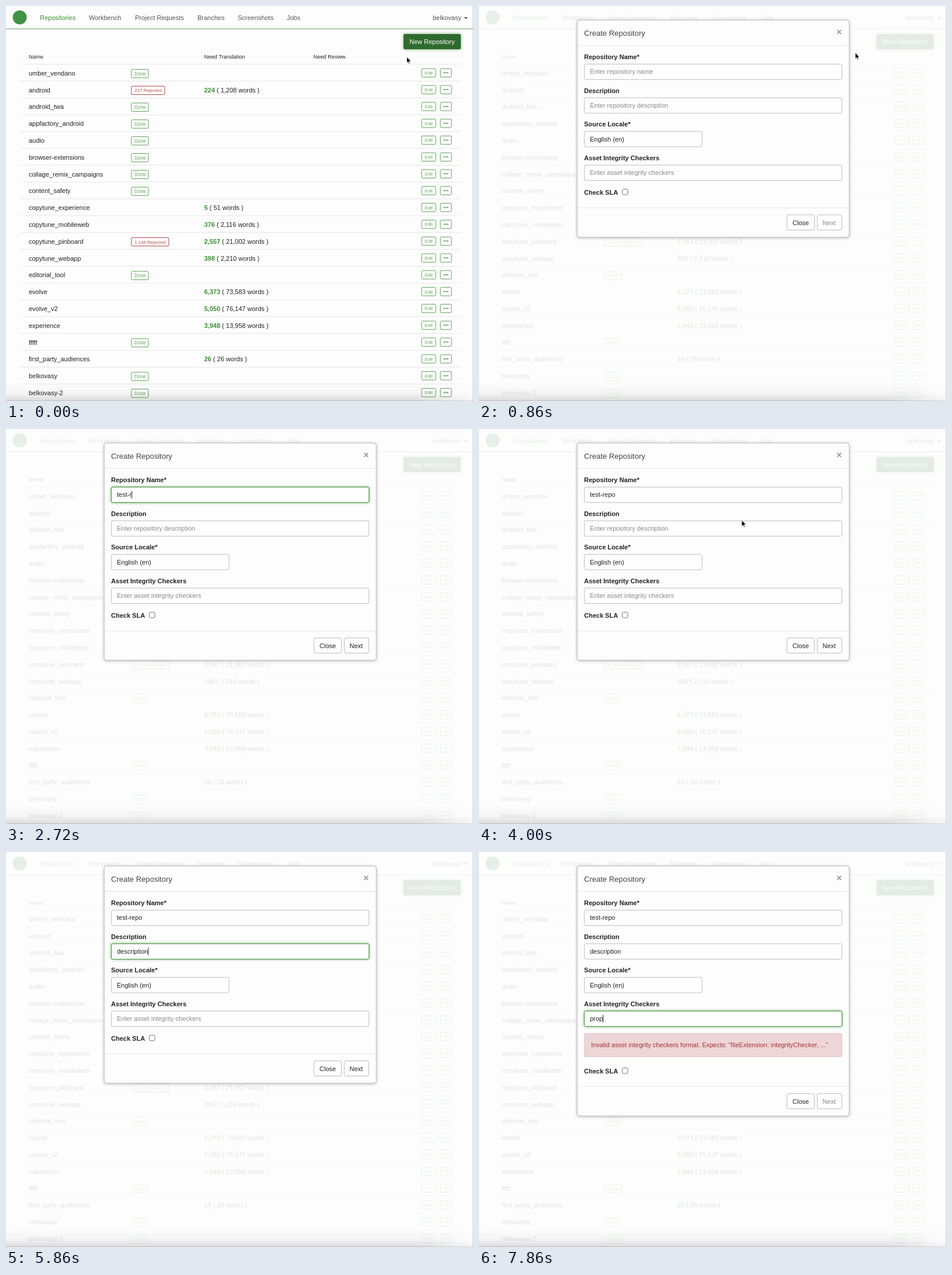
Write an HTML page that moves like this. It is 800x676 px and loops after 8 s.

```html
<!DOCTYPE html>
<html lang="en">
<head>
<meta charset="utf-8">
<title>Create Repository</title>
<style>
  html, body { margin: 0; width: 100%; height: 100%; overflow: hidden; background: #fdfdfd; }
  svg { display: block; width: 800px; height: 676px; }
  text { font: 11px "Liberation Sans", Arial, sans-serif; fill: #222; white-space: pre; }
  .b { font-weight: 700; }
  .green, .num { fill: #3c8f35; }
  .num { font-weight: 700; }
  .nav { fill: #555; }
  .box { fill: #fefefe; stroke: #bdbdbd; }
  .glow { fill: #fefefe; stroke: #45913c; filter: drop-shadow(0 0 2.5px rgba(80, 165, 65, .7)); }
  .ok { fill: none; stroke: #58a650; }
  .bad { fill: none; stroke: #b04343; }
  .line { stroke: #e6e6e6; }
  .hint { fill: #888; }
  #sheet { filter: drop-shadow(0 1px 2.5px rgba(0, 0, 0, .25)); fill: #fdfdfd; stroke: #b9b9b9; }
  #popup { filter: drop-shadow(0 1px 3px rgba(0, 0, 0, .35)); }
</style>
</head>
<body>
<svg viewBox="0 0 800 676">
  <defs>
    <linearGradient id="shade" x2="0" y2="1">
      <stop offset="0" stop-color="#000" stop-opacity="0"/>
      <stop offset=".6" stop-color="#000" stop-opacity=".035"/>
      <stop offset="1" stop-color="#000" stop-opacity=".14"/>
    </linearGradient>
    <linearGradient id="side">
      <stop offset=".88" stop-color="#fff"/>
      <stop offset="1" stop-color="#fff" stop-opacity=".25"/>
    </linearGradient>
    <mask id="fade"><rect y="640" width="800" height="36" fill="url(#side)"/></mask>
  </defs>

  <g id="page"></g>
  <rect id="backdrop" width="800" height="676" fill="#fdfdfd"/>
  <g mask="url(#fade)"><rect y="644" width="800" height="32" fill="url(#shade)"/></g>
  <path d="M0 675.5H800M799.5 0V676" stroke="#000" stroke-opacity=".12"/>

  <g id="modal">
    <rect id="sheet" x="168.2" y="24" width="466" rx="4"/>
    <path class="line" d="M169 67.5H634"/>
    <g id="form"></g>
    <g id="error">
      <rect x="180.4" y="310.4" width="441.400" height="40" rx="2.5" fill="#eed5d7" stroke="#e4c5c8"/>
    </g>
    <g id="foot">
      <path class="line" d="M169 345.5H634"/>
      <rect x="245.5" y="313.5" width="9.5" height="9.5" rx="2" fill="#fff" stroke="#777"/>
      <rect class="box" x="527.5" y="357.5" width="47" height="26" rx="2.5"/>
      <rect class="box" x="579.5" y="357.5" width="42" height="26" rx="2.5"/>
    </g>
    <g id="popup">
      <path d="M263 306h-1a4 4 0 0 0-4 4v26.500a4 4 0 0 0 4 4h113a4 4 0 0 0 4-4v-26.500a4 4 0 0 0-4-4H280L273 299.500 266 306z" fill="#fefefe"/>
    </g>
  </g>
  <path id="cursor" d="M0 0V10.600L2.400 8.400 4 12.100 5.700 11.400 4.100 7.800H7.500Z" fill="#000" stroke="#fff" stroke-width=".8"/>
</svg>

<script>
const LOOP = 8000;
const ROW = 28.8;
const $ = id => document.getElementById(id);

function add(parent, tag, attrs) {
  const el = document.createElementNS("http://www.w3.org/2000/svg", tag);
  for (const key in attrs) el.setAttribute(key, attrs[key]);
  return parent.appendChild(el);
}

// Text placed by its left edge and the middle of its capitals
function text(parent, x, mid, str, size = 11, cls = "", style = "") {
  const el = add(parent, "text", { x, y: mid + size * .35, class: cls, style: `font-size:${size}px;${style}` });
  el.textContent = str;
  return el;
}

function box(parent, x, y, width, height, cls, rx = 1.5) {
  return add(parent, "rect", { x: x + .4, y: y + .4, width, height, rx, class: cls });
}

function buildPage() {
  const page = $("page");
  add(page, "circle", { cx: 23.5, cy: 19.5, r: 12, fill: "#3f9344" });
  text(page, 58, 20, "Repositories", 11, "green");
  const nav = { Workbench: 142, "Project Requests": 221, Branches: 328, Screenshots: 397, Jobs: 481, belkovasy: 731 };
  for (const label in nav) text(page, nav[label], 20, label, 11, "nav");
  add(page, "path", { d: "M784.500 19h6.600l-3.300 3.400z", fill: "#555" });
  add(page, "path", { d: "M0 39.1H800", stroke: "#5da457" });

  add(page, "rect", {
    x: 681, y: 48, width: 98, height: 26, rx: 2, fill: "#2f6a2e",
    style: "filter:drop-shadow(0 0 2.500px rgba(70,150,60,.8))"
  });
  text(page, 691, 61, "New Repository", 11, "", "fill:#fff");

  text(page, 39, 87, "Name", 9.3);
  text(page, 339.5, 87, "Need Translation", 9.3);
  text(page, 526.5, 87, "Need Review", 9.3);

  // name | rejected count | strings | words
  const rows = `umber_vendano
android|227|224|1,208
android_twa
appfactory_android
audio
browser-extensions
collage_remix_campaigns
content_safety
copytune_experience||5|51
copytune_mobileweb||376|2,116
copytune_pinboard|1,146|2,557|21,002
copytune_webapp||398|2,210
editorial_tool
evolve||6,373|73,583
evolve_v2||5,050|76,147
experience||3,948|13,958
fffff
first_party_audiences||26|26
belkovasy
belkovasy-2`.split("\n");

  rows.forEach((row, i) => {
    const [name, rejected, count, words] = row.split("|");
    const y = i * ROW;
    add(page, "path", { class: "line", d: `M24 ${99.7 + y}H779` });
    text(page, 39, 114.9 + y, name);
    if (rejected) {
      box(page, 214.5, 108 + y, rejected.length > 3 ? 64 : 57, 14.4, "bad");
      text(page, 220, 115.8 + y, rejected + " Rejected", 8, "", "fill:#b85252");
    } else if (!count) {
      box(page, 214.5, 108 + y, 29, 14.4, "ok");
      text(page, 220, 115.8 + y, "Done", 8.2, "", "fill:#66ad5e");
    }
    if (count) {
      const cell = text(page, 339.5, 114.9 + y, "");
      add(cell, "tspan", { class: "num" }).textContent = count;
      add(cell, "tspan", {}).textContent = ` ( ${words} words )`;
    }
    box(page, 711.7, 106.8 + y, 24, 14.4, "ok");
    text(page, 717.3, 114.3 + y, "Edit", 8, "", "fill:#66ad5e");
    box(page, 743.7, 106.8 + y, 19, 14.4, "ok");
    for (const x of [750.6, 753.6, 756.6])
      add(page, "circle", { cx: x, cy: 114.3 + y, r: 1, fill: "#35702f" });
  });
}

// Label above an empty control
function control(y, label, width) {
  text($("form"), 180, y - 11.6, label, 11, "b");
  box($("form"), 180, y, width, 26.4, "box", 2.5);
}

// An input with label, focus ring, typed value and caret
function field(y, label, hint) {
  const form = $("form");
  control(y, label, 441.4);
  const ring = box(form, 180, y, 441.4, 26.4, "glow", 2.5);
  const value = text(form, 190, y + 13.6, "");
  const caret = add(form, "path", { stroke: "#222" });
  return (str, focus) => {
    ring.setAttribute("opacity", focus);
    value.textContent = str || hint;
    value.setAttribute("class", str ? "" : "hint");
    const x = 190.5 + (str ? value.getComputedTextLength() : 0);
    caret.setAttribute("d", str && focus > .5 ? `M${x} ${y + 7}v13` : "");
  };
}

buildPage();
const form = $("form"), foot = $("foot"), top0 = 99;
text(form, 180, 46, "Create Repository", 13, "", "fill:#444");
text(form, 612.3, 44.5, "×", 16, "b", "fill:#999");
const setName = field(top0, "Repository Name*", "Enter repository name");
const setDesc = field(top0 + 2 * ROW, "Description", "Enter repository description");
control(top0 + 4 * ROW, "Source Locale*", 201.6);
text(form, 190, 227.8, "English (en)");
const setCheck = field(top0 + 6 * ROW, "Asset Integrity Checkers", "Enter asset integrity checkers");
text($("error"), 192, 330.5,
  'Invalid asset integrity checkers format. Expects: "fileExtension: integrityChecker, ..."', 11, "", "fill:#a3323a");
text(foot, 180, 319.3, "Check SLA", 11, "b");
text(foot, 537, 371, "Close");
const next = text(foot, 588.5, 371, "Next");
text($("popup"), 267, 323, "asdf:asdf", 10.3, "", "font-family:Inter,sans-serif;font-weight:500");

const clamp = v => Math.min(1, Math.max(0, v));
const ramp = (t, start, length = 150) => clamp((t - start) / length);
const focus = (t, on, off) => ramp(t, on) * (1 - ramp(t, off));

// Typed part of a word, from [time, letters] steps
function typed(word, keys, t) {
  let n = 0;
  for (const [at, count] of keys) if (t >= at) n = count;
  return word.slice(0, n);
}

const nameKeys = [[2140, 1], [2280, 2], [2420, 4], [2710, 6], [2850, 7], [2990, 8], [3140, 9]];
const descKeys = [[4850, 1], [4990, 3], [5140, 4], [5280, 6], [5420, 7], [5560, 8], [5710, 9], [5850, 11]];
const checkKeys = [[7560, 1], [7710, 3], [7850, 4]];

// Pointer strokes: [time, x, y]; the pointer hides while keys are pressed
const strokes = [
  [[0, 686.5, 87], [430, 664, 81], [860, 644.5, 80], [1150, 505, 107], [1430, 441, 112], [2130, 441, 112]],
  [[3420, 441, 114], [3720, 449, 151], [4000, 450, 156], [4570, 450, 156], [4710, 450, 166], [4840, 450, 166]],
  [[6420, 450, 168], [6720, 432, 206], [7150, 372, 279], [7430, 360, 289], [7550, 360, 289]]
];

function pointer(t) {
  const path = strokes.find(s => t >= s[0][0] && t <= s[s.length - 1][0]);
  if (!path) return null;
  const i = Math.max(1, path.findIndex(p => p[0] >= t));
  const [t0, x0, y0] = path[i - 1], [t1, x1, y1] = path[i];
  const k = (t - t0) / (t1 - t0);
  return [x0 + (x1 - x0) * k, y0 + (y1 - y0) * k];
}

function render(t) {
  $("backdrop").setAttribute("opacity", .88 * ramp(t, 90));
  const slide = 1 - (1 - ramp(t, 180, 300)) ** 2;
  $("modal").setAttribute("opacity", ramp(t, 180));
  $("modal").setAttribute("transform", `translate(0 ${-93 * (1 - slide)})`);

  const name = typed("test-repo", nameKeys, t);
  const check = typed("prop", checkKeys, t);
  setName(name, focus(t, 1380, 3800));
  setDesc(typed("description", descKeys, t), focus(t, 4500, 6650));
  setCheck(check, focus(t, 7320, LOOP));

  const grow = check ? 56 : 0;
  $("sheet").setAttribute("height", 371.8 + grow);
  foot.setAttribute("transform", `translate(0 ${grow})`);
  $("error").setAttribute("visibility", check ? "visible" : "hidden");
  next.style.fill = name && !check ? "#222" : "#888";
  $("popup").setAttribute("visibility", t >= 7400 && !check ? "visible" : "hidden");

  const at = pointer(t);
  $("cursor").setAttribute("visibility", at ? "visible" : "hidden");
  if (at) $("cursor").setAttribute("transform", `translate(${at})`);
}

function tick(now) {
  const step = Math.floor((now % LOOP) * .007 + .015) % 56;
  render(step * 1000 / 7);
  requestAnimationFrame(tick);
}
render(0);
requestAnimationFrame(tick);
</script>
</body>
</html>
```
